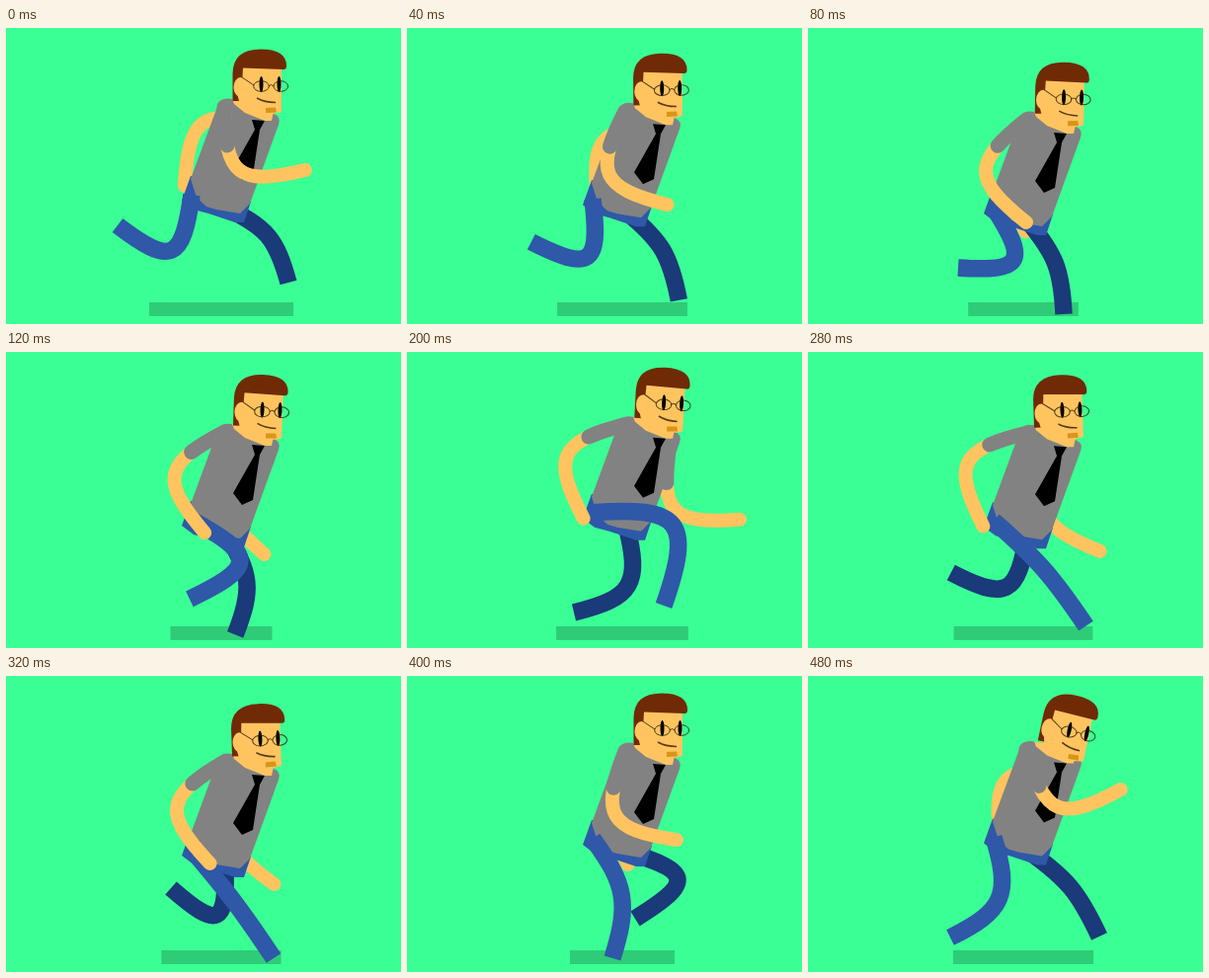
Animation of 400x300 px, one loop 560 ms. Source, as an HTML page:

```html
<!DOCTYPE html>
<html lang="en">
<head>
<meta charset="utf-8">
<title>Running man</title>
<style>
  html, body { margin: 0; width: 100%; height: 100%; overflow: hidden; background: #3aff94; }
  svg { display: block; width: 100%; height: 100%; }
  .leg, .arm, .sleeve, .line { fill: none; }
  .leg { stroke-width: 17.5; }
  .arm { stroke: #ffc45f; stroke-width: 14; stroke-linecap: round; }
  .sleeve { stroke: #828282; stroke-width: 15; stroke-linecap: round; stroke-dasharray: 39 999; }
  .line { stroke: #2a1c08; stroke-width: 1; stroke-opacity: .8; }
  .skin { fill: #ffc45f; }
</style>
</head>
<body>
<svg viewBox="0 0 400 300">
  <rect width="400" height="300" fill="#3aff94"/>
  <rect id="shadow" y="278" height="14" fill="#2fcc77"/>
  <path id="farArm" class="arm"/>
  <path id="farSleeve" class="sleeve"/>
  <path id="farLeg" class="leg" stroke="#1a3a7a"/>
  <g id="torso">
    <path fill="#2f58a8" d="M187 150L178 175L190 184L205 188L232 197H241L248 176Z"/>
    <path fill="#828282" d="M215 77Q219 70 229 72L271 87Q279 90 276 98L247 178L237 188L213 184L203 181L193 172L187 153Z"/>
    <path class="skin" d="M229 72L231 77L242 86L262 94L269 94L272 80Z"/>
    <path d="M249 93L262 94L257 103L250 149L239 154L230 142L252 103Z"/>
  </g>
  <path id="nearLeg" class="leg" stroke="#2f58a8"/>
  <g id="head">
    <path class="skin" d="M236 40H279V85Q272 88 262 86L238 80L230 70Z"/>
    <path fill="#702a06" d="M229.500 74V46Q230 21.500 258 21.500Q284 21.500 284 38.500Q284 42 281 42L240 40.500L238 74Z"/>
    <ellipse class="skin" cx="237.500" cy="60" rx="7" ry="10"/>
    <path class="skin" d="M234 66L245 58V78L236 74Z"/>
    <ellipse cx="258.500" cy="57" rx="2" ry="8"/>
    <ellipse cx="276.500" cy="57" rx="2" ry="8"/>
    <path class="line" d="M239 50L251 58M266 59Q268.500 56 271 59"/>
    <ellipse class="line" cx="258.500" cy="59" rx="7.800" ry="5.300"/>
    <ellipse class="line" cx="278.300" cy="59" rx="7.300" ry="5.300"/>
    <path class="line" style="stroke-width:1.6" d="M254 71Q262 75.500 273 75.500"/>
    <path fill="#d9951a" d="M263 81L273 80.500L274 85.500L263 86Z"/>
  </g>
  <path id="nearArm" class="arm"/>
  <path id="nearSleeve" class="sleeve"/>
</svg>
<script>
const STEP = 40, LOOP = 560, LAST = 12, CYCLE = 13, STRIDE = CYCLE / 2;
const REACH = 104, ELBOW = -65;   // an arm keeps its shape and only swings
const ROUND = 0.84;               // how closely a limb follows its joint

// Key poses of the run, in steps.
const beats = [0, 2, 5, 6, 8, 10, 12];
const nearLeg = {
  x: [113, 152, 260, 281, 271, 208, 144],
  y: [200, 243, 257, 267, 286, 286, 265],
  knee: [70, 70, 90, 29, 4, 31, 47]
};
const farLeg = {
  x: [286, 259, 169, 135, 167, 231, 295],
  y: [258, 290, 264, 241, 215, 246, 264],
  knee: [23, 17, 52, 52, 70, 76, 15]
};
// Degrees forward of hanging straight down.
const nearSwing = [52, 0, -24, -36, -8, 30, 67];
const farSwing = [-55, -26, 43, 30, 3, -24, -42];
const tilt = [0, 1, 3, -1, -2, 0, 12];

// The body dips once per stride.
const dipBeats = [0, 1.5, 2, 3.5, 5.3];
const dip = [0, 7, 13, -4, -6];

// Smooth cyclic curve through unevenly spaced keys.
function spline(times, values, period, pos) {
  const n = times.length;
  const key = i => {
    const turn = Math.floor(i / n), j = i - turn * n;
    return { t: times[j] + turn * period, v: values[j] };
  };
  pos %= period;
  let i = n - 1;
  while (times[i] > pos) i--;
  const [a, b, c, d] = [-1, 0, 1, 2].map(k => key(i + k));
  const span = c.t - b.t, u = (pos - b.t) / span, w = 1 - u;
  const m0 = (c.v - a.v) / (c.t - a.t) * span;
  const m1 = (d.v - b.v) / (d.t - b.t) * span;
  return w * w * ((1 + 2 * u) * b.v + u * m0) + u * u * ((3 - 2 * u) * c.v - w * m1);
}

const pose = (values, pos) => spline(beats, values, CYCLE, pos);
const set = (id, attr, value) => document.getElementById(id).setAttribute(attr, value);

// Rubber limb from (x, y) to (tx, ty), its joint pushed sideways by bow.
function limb(x, y, tx, ty, bow) {
  const dx = tx - x, dy = ty - y, d = Math.hypot(dx, dy);
  const jx = (x + tx) / 2 + dy / d * bow;
  const jy = (y + ty) / 2 - dx / d * bow;
  const pull = (from, to) => from + (to - from) * ROUND;
  return `M${x} ${y}C${pull(x, jx)} ${pull(y, jy)} ${pull(tx, jx)} ${pull(ty, jy)} ${tx} ${ty}`;
}

function drawLeg(id, leg, x, y, pos) {
  const [tx, ty, knee] = [leg.x, leg.y, leg.knee].map(v => pose(v, pos));
  set(id, "d", limb(x, y, tx, ty, knee));
}

function drawArm(side, swing, x, y, pos) {
  const a = pose(swing, pos) * Math.PI / 180;
  const d = limb(x, y, x + REACH * Math.sin(a), y + REACH * Math.cos(a), ELBOW);
  set(side + "Arm", "d", d);
  set(side + "Sleeve", "d", d);
}

function draw(ms) {
  const pos = Math.min(LAST, Math.floor(ms % LOOP / STEP));
  const bob = spline(dipBeats, dip, STRIDE, pos);
  const half = 62.5 + 11 * Math.cos(2 * Math.PI * (pos + 0.3) / STRIDE);

  drawArm("far", farSwing, 266, 100 + bob, pos);
  drawArm("near", nearSwing, 221, 80 + bob, pos);
  drawLeg("farLeg", farLeg, 222, 182 + bob, pos);
  drawLeg("nearLeg", nearLeg, 188, 169 + bob, pos);
  set("shadow", "x", 218 - half);
  set("shadow", "width", half * 2);
  set("torso", "transform", `translate(0 ${bob})`);
  set("head", "transform", `translate(0 ${bob}) rotate(${pose(tilt, pos)} 247 88)`);
}

const start = performance.now();
function tick() {
  draw(performance.now() - start);
  requestAnimationFrame(tick);
}
draw(0);
requestAnimationFrame(tick);
</script>
</body>
</html>
```
